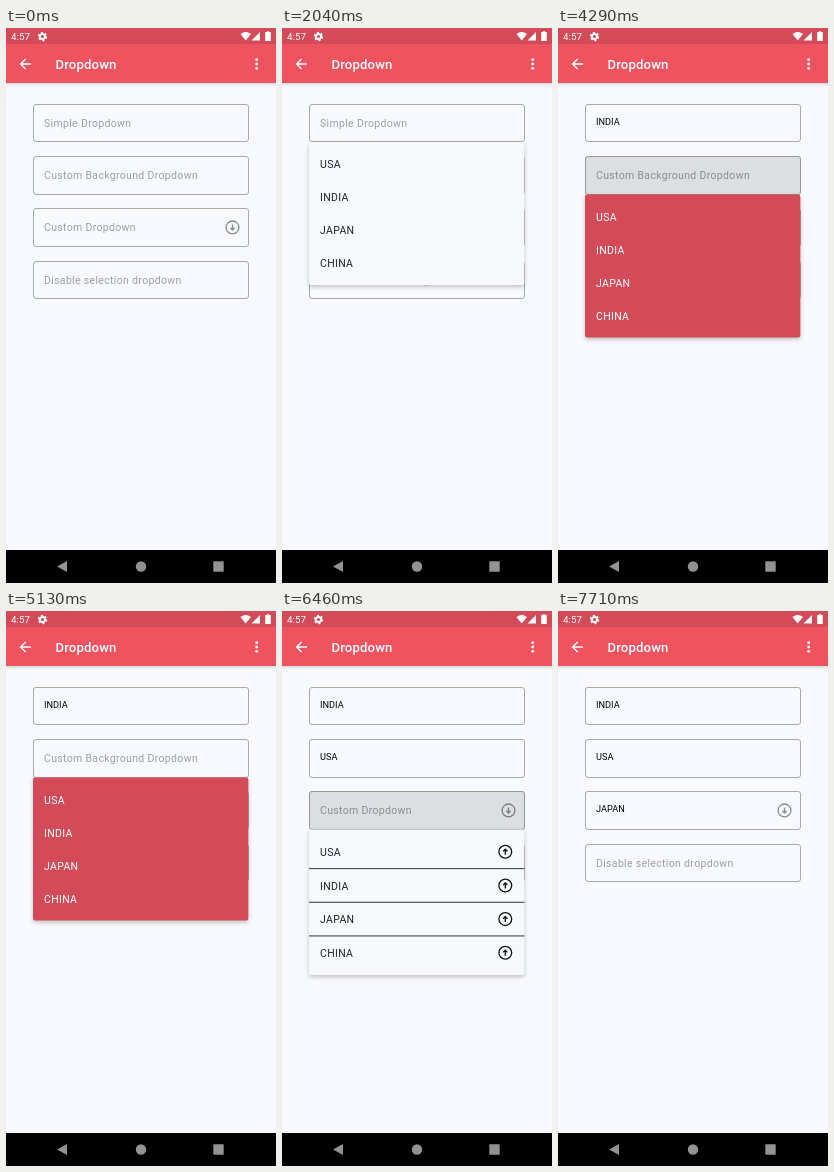
These frames come from a looping animation (270 by 555 pixels, 8 s). An HTML page:

```html
<!DOCTYPE html>
<html lang="en">
<head>
<meta charset="utf-8">
<title>Dropdown</title>
<style>
html, body { margin: 0; height: 100%; overflow: hidden; background: #f8f9fe; }
svg { display: block; width: 100vw; height: 100vh; font-family: Roboto, sans-serif; }
.hint, .item { font-size: 10.5px; letter-spacing: .33px; }
.hint { fill: #a09f9c; }
.value { font-size: 9.2px; fill: #000; }
.title { font-size: 13.1px; font-weight: 500; letter-spacing: .17px; }
.popup { filter: drop-shadow(0 2px 2px rgba(60, 50, 30, .28)); }
</style>
</head>
<body>
<svg viewBox="0 0 270 555">
  <defs>
    <linearGradient id="shade" x2="0" y2="1">
      <stop stop-color="#000" stop-opacity=".14"/><stop offset="1" stop-color="#000" stop-opacity="0"/>
    </linearGradient>
    <g id="down" fill="none" stroke-width="1.3">
      <circle r="6.4"/><path d="M0-3V2.2M-2.1 .4L0 2.6L2.1 .4"/>
    </g>
  </defs>
  <rect width="270" height="555" fill="#f8f9fe"/>
  <rect y="55" width="270" height="3" fill="url(#shade)"/>
  <rect y="16" width="270" height="39" fill="#ef5360"/>
  <rect width="270" height="16" fill="#d34a58"/>
  <g fill="#fff">
    <text x="5" y="12" font-size="9.8">4:57</text>
    <circle cx="36.5" cy="8.5" r="2.6" fill="none" stroke="#fff" stroke-width="2"/>
    <circle cx="36.5" cy="8.5" r="4" fill="none" stroke="#fff" stroke-width="1.4" stroke-dasharray="2.1 2.09"/>
    <path d="M234.5 6Q239.7 2.2 245 6L239.7 12.5ZM254 4V12.5H245.5ZM260.8 4V3.2H263.2V4H264.8V13H259.2V4Z"/>
    <text class="title" x="49.6" y="41">Dropdown</text>
    <circle cx="250.7" cy="31.7" r="1.4"/><circle cx="250.7" cy="36" r="1.4"/><circle cx="250.7" cy="40.3" r="1.4"/>
  </g>
  <path d="M25 36H15M19.6 31L14.6 36L19.6 41" fill="none" stroke="#fff" stroke-width="1.4"/>
  <g id="fields"></g>
  <g id="popups"></g>
  <circle id="touch" r="7.5" fill="#fff" fill-opacity=".45" stroke="#777" stroke-opacity=".22" stroke-width=".8"/>
  <rect y="522" width="270" height="33"/>
  <g fill="#929292">
    <path d="M51 538.5L61 533V544Z"/><circle cx="135" cy="538.5" r="5.2"/><rect x="207.3" y="533.3" width="10.4" height="10.4" rx=".6"/>
  </g>
</svg>
<script>
const LOOP = 8000;
const countries = ['USA', 'INDIA', 'JAPAN', 'CHINA'];
const $ = id => document.getElementById(id);

// tap and choose: [x, y, shown, hidden]; press: [start, filled, released]; fade: [start, end]
const fields = [
  { y: 76, h: 37, hint: 'Simple Dropdown', pick: 'INDIA', fill: '#f7f8fc', ink: '#222', step: 33,
    tap: [113, 102, 1500, 1590], press: [1590, 1590, 2040], open: 1840,
    choose: [93, 159, 2670, 2880], fade: [2880, 3090] },
  { y: 128, h: 38, hint: 'Custom Background Dropdown', pick: 'USA', fill: '#d34a58', ink: '#fff', step: 33,
    tap: [94, 159.5, 3630, 3790], press: [3790, 4040, 4500], open: 4290,
    choose: [94, 189, 4840, 5040], fade: [5190, 5420] },
  { y: 180, h: 38, hint: 'Custom Dropdown', pick: 'JAPAN', fill: '#f7f8fc', ink: '#222', step: 33.65, icons: true,
    tap: [110, 202, 5840, 6000], press: [5960, 6210, 6590], open: 6460,
    choose: [100, 303, 7290, 7460], fade: [7460, 7710] },
  { y: 233, h: 37, hint: 'Disable selection dropdown' }
];

const fieldMarkup = (f, i) => `
  <clipPath id="clip${i}"><rect x="27" y="${f.y}" width="216" height="${f.h + 1}" rx="2.5"/></clipPath>
  <rect x="27.5" y="${f.y + .5}" width="215" height="${f.h}" rx="2.5" fill="none" stroke="#aaa9a4"/>
  <text id="hint${i}" class="hint" x="38" y="${f.y + 22.7}">${f.hint}</text>
  ${f.icons ? `<use href="#down" x="226.5" y="${f.y + 19.4}" stroke="#8d8c88"/>` : ''}
  ${f.pick ? `<text id="value${i}" class="value" x="38" y="${f.y + 21.3}">${f.pick}</text>
  <circle id="ripple${i}" cx="${f.tap[0]}" cy="${f.tap[1]}" fill-opacity=".11" clip-path="url(#clip${i})"/>` : ''}`;

function popupMarkup(f, i) {
  const top = f.y + f.h + (i ? .5 : 1);
  const rows = countries.map((name, n) => {
    const mid = top + 22.6 + n * f.step;
    const line = mid + f.step / 2 - .3;
    return `<text class="item" x="38" y="${mid + 3.8}" fill="${f.ink}">${name}</text>` + (f.icons ?
      `<use href="#down" transform="translate(223.3 ${mid - .3}) scale(1 -1)" stroke="#111"/>` +
      (n < 3 ? `<path d="M27 ${line}H242.5" stroke="#333"/>` : '') : '');
  });
  return `<g id="popup${i}" class="popup">
    <rect x="27" y="${top}" width="215.3" height="${f.step * 4 + 11}" rx="2" fill="${f.fill}"/>${rows.join('')}</g>`;
}

const menus = fields.filter(f => f.pick);
$('fields').innerHTML = fields.map(fieldMarkup).join('');
$('popups').innerHTML = menus.map(popupMarkup).join('');

const progress = (t, a, b) => b > a ? Math.min(1, Math.max(0, (t - a) / (b - a))) : +(t >= a);
const show = (el, on) => el.setAttribute('visibility', on ? 'visible' : 'hidden');

function draw(t) {
  let touch;
  menus.forEach((f, i) => {
    const [start, filled, released] = f.press;
    const [gone, end] = f.fade;
    show($('hint' + i), t < gone);
    show($('value' + i), t >= gone);
    show($('ripple' + i), t >= start && t < released);
    $('ripple' + i).setAttribute('r', 20 + 180 * progress(t, start, filled));
    show($('popup' + i), t >= f.open && t < end);
    $('popup' + i).style.opacity = (1 - progress(t, gone, end)) ** 2.5;
    touch = [f.tap, f.choose].find(p => t >= p[2] && t < p[3]) || touch;
  });
  show($('touch'), touch);
  if (touch) $('touch').setAttribute('transform', `translate(${touch[0]} ${touch[1]})`);
}

const begin = performance.now();
function tick() {
  draw((performance.now() - begin) % LOOP);
  requestAnimationFrame(tick);
}
tick();
</script>
</body>
</html>
```
